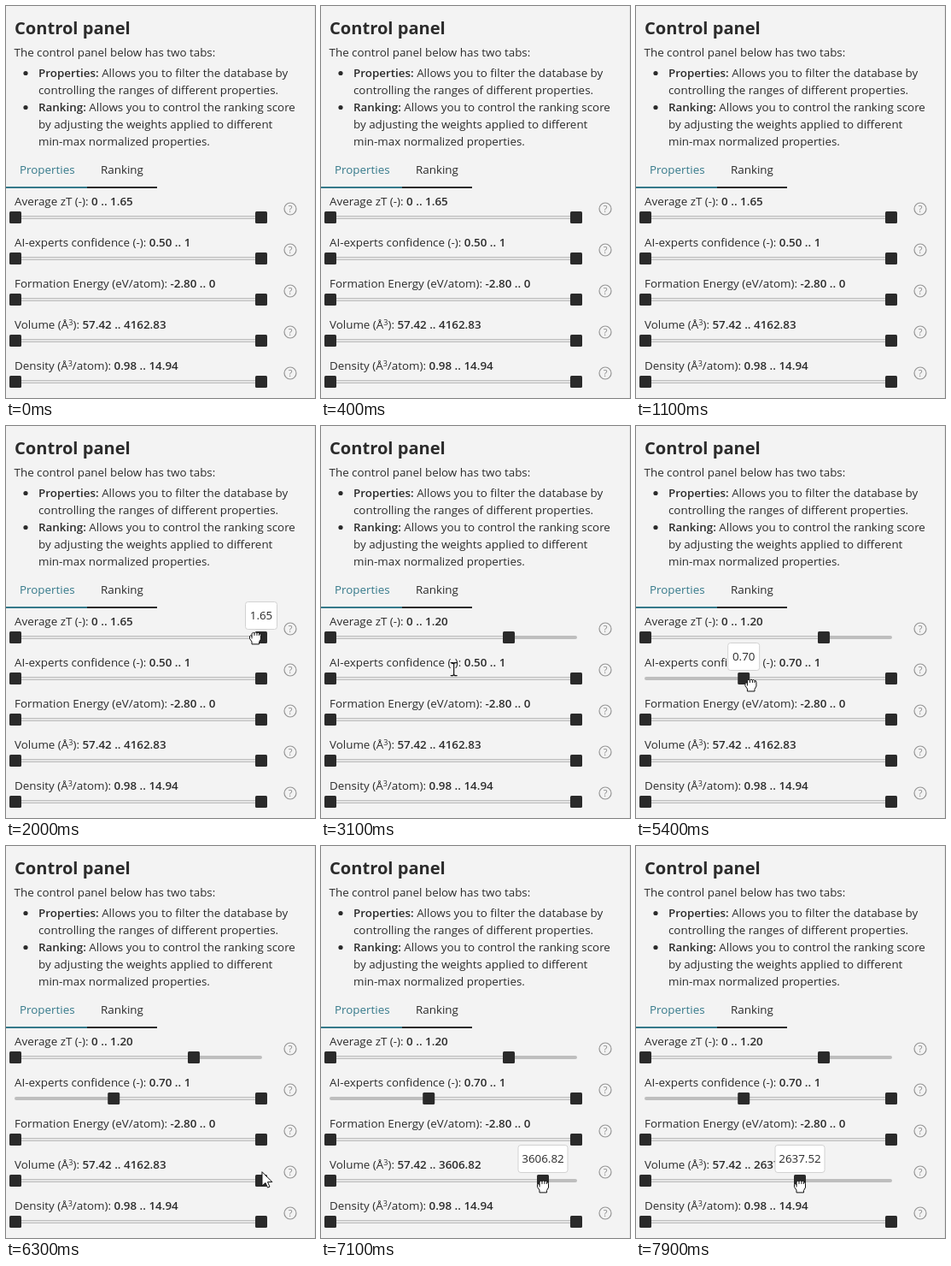
An HTML page for the animation above (8 s loop, 362 by 458 pixels).

```html
<!DOCTYPE html>
<html lang="en">
<head>
<meta charset="utf-8">
<title>Control panel</title>
<style>
html, body { margin: 0; width: 100%; height: 100%; overflow: hidden; background: #f3f3f3; }
svg { display: block; width: 362px; height: 458px; font: 13.4px "Open Sans", "Noto Sans", sans-serif; fill: #2b2b2b; }
.b { font-weight: 600; }
.title { font-size: 20.1px; font-weight: 700; }
.mid { text-anchor: middle; }
.help { font-size: 11px; fill: #8c8c8c; text-anchor: middle; }
</style>
</head>
<body>
<svg id="stage" viewBox="0 0 362 458">
  <rect width="362" height="458" fill="#f3f3f3"/>
  <path d="M361.5 0V458" stroke="#e6e6e6"/>
  <text class="title" x="10" y="33">Control panel</text>
  <text x="9.5" y="59">The control panel below has two tabs:</text>
  <circle cx="23" cy="78.5" r="2.6"/>
  <text x="38" y="83"><tspan class="b">Properties:</tspan> Allows you to filter the database by</text>
  <text x="38" y="103">controlling the ranges of different properties.</text>
  <circle cx="23" cy="118.5" r="2.6"/>
  <text x="38" y="123"><tspan class="b">Ranking:</tspan> Allows you to control the ranking score</text>
  <text x="38" y="143">by adjusting the weights applied to different</text>
  <text x="38" y="163">min-max normalized properties.</text>
  <text x="16" y="196" fill="#35798a">Properties</text>
  <text x="111" y="196">Ranking</text>
  <path d="M0 212H95" stroke="#35798a" stroke-width="2"/>
  <path d="M95 212H177" stroke="#2b2b2b" stroke-width="2"/>
  <g id="rows"></g>
  <g id="tip">
    <rect rx="3" height="32" fill="#fff" stroke="#d2d2d2"/>
    <text class="mid"></text>
  </g>
  <g id="cursor" stroke-linejoin="round" stroke-linecap="round">
    <path id="arrow" d="M0 0V16L4 12.5L6.5 18L9 17L6.5 11.5H11.5Z" fill="#fff" stroke="#111"/>
    <path id="beam" d="M-3.5 -7.5H-1L0 -6.5L1 -7.5H3.5M0 -6.5V6.5M-3.5 7.5H-1L0 6.5L1 7.5H3.5" fill="none" stroke="#111" stroke-width="1.2"/>
    <g id="hand" stroke="#111" fill="#fff">
      <path d="M-4 7.5V5L-6.5 1.5V-1.5Q-5.5 -3 -4 -1.5V-4.5Q-2.5 -6.5 -1 -5Q0.5 -7 2 -5Q3.5 -6.5 4.5 -4.5Q6.5 -5 6.5 -2.5V2L4.5 5.5V7.5Z"/>
      <path d="M-4 -1.5V1M-1 -4.5V-2.5M2 -4.5V-2.5M4.5 -4V-2.5" fill="none"/>
    </g>
  </g>
</svg>
<script>
const LOOP = 8000, LEFT = 11, RIGHT = 299, SPAN = RIGHT - LEFT;
const $ = id => document.getElementById(id);
const clamp = (v, a, b) => Math.min(b, Math.max(a, v));

const cubed = `(Å<tspan dy="-4.5" font-size="9">3</tspan><tspan dy="4.5">`;

// label, minimum text, maximum text
const rows = [
  ["Average zT (-):", "0", "1.65"],
  ["AI-experts confidence (-):", "0.50", "1"],
  ["Formation Energy (eV/atom):", "-2.80", "0"],
  [`Volume ${cubed}):</tspan>`, "57.42", "4162.83"],
  [`Density ${cubed}/atom):</tspan>`, "0.98", "14.94"]
].map(([label, min, max], i) => {
  const g = document.createElementNS("http://www.w3.org/2000/svg", "g");
  const handle = at => `<rect class="handle" x="${at - 7}" y="240" width="14" height="14" rx="1.5" fill="#2a2a2a"/>`;
  g.setAttribute("transform", `translate(0 ${48 * i})`);
  g.innerHTML = `<text x="10" y="233">${label} <tspan class="b value"></tspan></text>
    <rect x="10" y="245" width="290" height="4" rx="2" fill="#bebebe"/>
    <rect class="range" y="245.5" height="3" fill="#e4e4e4" stroke="#bebebe"/>
    ${handle(LEFT)}${handle(RIGHT)}
    <circle cx="333" cy="237" r="7" fill="none" stroke="#959595" stroke-width="1.2"/>
    <text class="help" x="333" y="241">?</text>`;
  $("rows").append(g);
  const [lo, hi] = g.querySelectorAll(".handle");
  return { min, max, lo, hi, value: g.querySelector(".value"), range: g.querySelector(".range"), y: 247 + 48 * i };
});

// time, x, y, pointer shape until the next key
const keys = [
  [1200, 344, 262, "arrow"], [1700, 296, 247, "hand"], [2000, 292, 247, "hand"],
  [2100, 292, 247, "hand"], [2700, 213, 247, "hand"], [2850, 213, 248, "arrow"],
  [3050, 163, 280, "beam"], [3100, 156, 284, "beam"], [3250, 105, 289, "hand"],
  [3500, 11, 297, "hand"], [3800, 11, 297, "hand"], [4500, 93, 305, "hand"],
  [5000, 129, 299, "hand"], [5350, 129, 299, "hand"], [5500, 145, 308, "arrow"],
  [6100, 296, 376, "arrow"], [6300, 300, 381, "arrow"], [6450, 299, 395, "hand"],
  [6700, 299, 397, "hand"], [7800, 192, 397, "hand"], [LOOP, 192, 397, "hand"]
];

function pointer(t) {
  const i = clamp(keys.findIndex(k => k[0] > t), 1, keys.length - 1);
  const a = keys[i - 1], b = keys[i];
  const p = clamp((t - a[0]) / (b[0] - a[0]), 0, 1);
  return { x: a[1] + (b[1] - a[1]) * p, y: a[2] + (b[2] - a[2]) * p, shape: a[3] };
}

const dragX = (t, start, end) => pointer(clamp(t, start, end)).x;

function setRow(row, lo, hi, min = row.min, max = row.max) {
  row.lo.setAttribute("x", lo - 7);
  row.hi.setAttribute("x", hi - 7);
  row.range.setAttribute("x", lo);
  row.range.setAttribute("width", hi - lo);
  row.value.textContent = `${min} .. ${max}`;
  row.ends = [[lo, min], [hi, max]];
}

// The tooltip shows while the hand is over a handle.
function showTip(c) {
  let hit;
  if (c.shape === "hand") for (const row of rows) for (const [x, text] of row.ends)
    if (Math.abs(c.x - x) < 9 && Math.abs(c.y - row.y) < 9) hit = { x, text, y: row.y };
  $("tip").style.display = hit ? "" : "none";
  if (!hit) return;
  const [box, label] = $("tip").children;
  const w = 9 + 7 * hit.text.length;
  box.setAttribute("x", hit.x - w / 2);
  box.setAttribute("y", hit.y - 41.5);
  box.setAttribute("width", w);
  label.setAttribute("x", hit.x);
  label.setAttribute("y", hit.y - 21);
  label.textContent = hit.text;
}

function draw(t) {
  rows.forEach(row => setRow(row, LEFT, RIGHT));
  const zt = dragX(t, 2100, 2700) + 7;
  setRow(rows[0], LEFT, zt, "0", ((zt - LEFT) / SPAN * 1.65).toFixed(2));
  const step = Math.round((dragX(t, 3800, 5000) - LEFT) / SPAN * 5);
  setRow(rows[1], LEFT + step * SPAN / 5, RIGHT, (0.5 + step / 10).toFixed(2));
  if (t > 6700) {
    const vol = dragX(t, 6700, 7800);
    const tenths = Math.round((vol - LEFT) / SPAN * 41054.1);
    setRow(rows[3], LEFT, vol, "57.42", (57.42 + tenths / 10).toFixed(2));
  }

  const c = pointer(t);
  if (t < keys[0][0]) c.shape = "";
  $("cursor").setAttribute("transform", `translate(${c.x} ${c.y})`);
  for (const id of ["arrow", "beam", "hand"]) $(id).style.display = id === c.shape ? "" : "none";
  showTip(c);
}

const begin = performance.now();
function tick() {
  draw((performance.now() - begin) % LOOP);
  requestAnimationFrame(tick);
}
tick();
</script>
</body>
</html>
```
